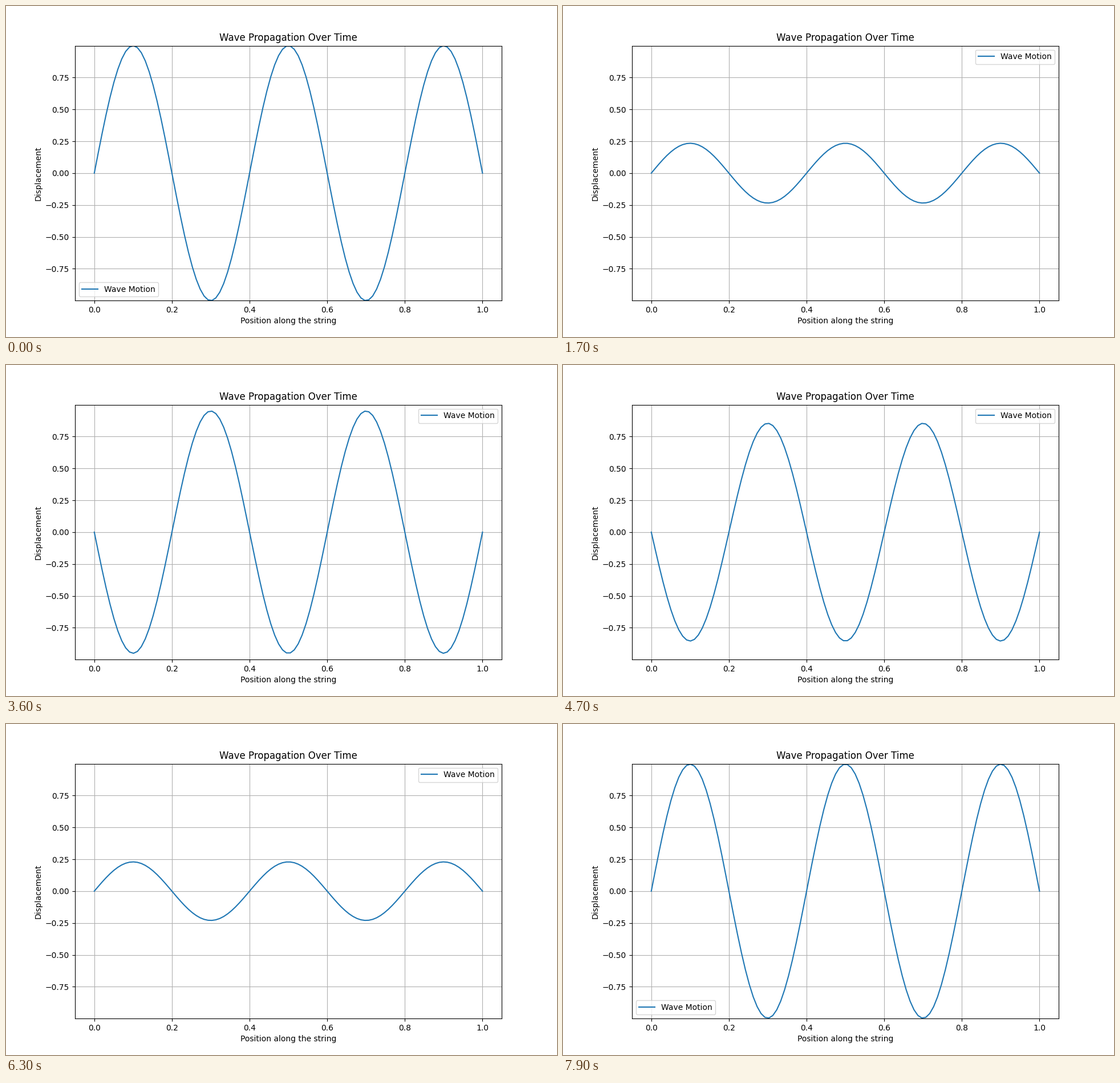
Recreate the animation shown at these times as a matplotlib script. Size 966x580 px, loop 8000 ms.

```python
import numpy as np
import matplotlib.pyplot as plt
from matplotlib.animation import FuncAnimation

FRAMES = 80
INTERVAL = 100  # ms
POINTS = 100
MODE = 5        # half waves along the string
SPEED = 1.0
DT = 0.005

x = np.linspace(0, 1, POINTS)
dx = x[1] - x[0]
shape = np.sin(MODE * np.pi * x)

# Phase advance per step of the leapfrog wave equation for this mode
courant = SPEED * DT / dx
phase = 2 * np.arcsin(courant * np.sin(MODE * np.pi * dx / 2))

fig, ax = plt.subplots(figsize=(9.66, 5.8), dpi=100)
line, = ax.plot(x, shape, label="Wave Motion")
ax.set_ylim(-shape.max(), shape.max())
ax.set_title("Wave Propagation Over Time")
ax.set_xlabel("Position along the string")
ax.set_ylabel("Displacement")
ax.grid(True)
ax.legend(loc="best")  # moves aside when the crests reach the corner


def update(step):
    line.set_ydata(np.cos(phase * step) * shape)
    return line,


anim = FuncAnimation(fig, update, frames=FRAMES, interval=INTERVAL,
                     repeat=True, repeat_delay=0, blit=False)
plt.show()
```
